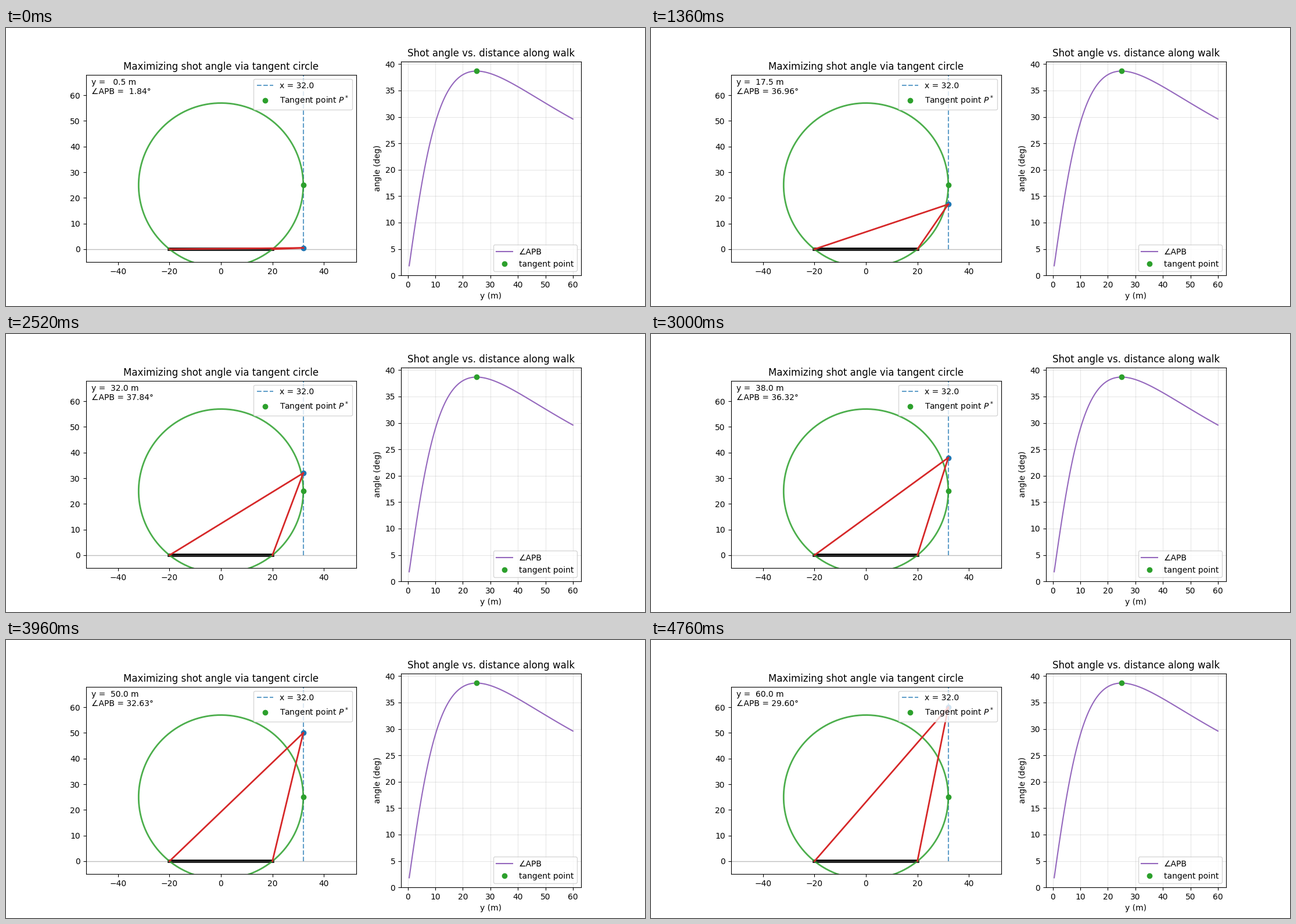
These frames come from a looping animation (1100 px wide and 480 px high, 4800 ms). A matplotlib script:

```python
import numpy as np
import matplotlib.pyplot as plt
from matplotlib.animation import FuncAnimation

HALF_GOAL = 20.0
WALK_X = 32.0
FRAMES = 120
INTERVAL = 40

walk = np.linspace(0.5, 60, FRAMES)
best_y = np.sqrt(WALK_X**2 - HALF_GOAL**2)


def shot_angle(y):
    """Angle APB in degrees, seen from (WALK_X, y)."""
    far = np.arctan2(WALK_X + HALF_GOAL, y)
    near = np.arctan2(WALK_X - HALF_GOAL, y)
    return np.degrees(far - near)


fig, (field, chart) = plt.subplots(
    1, 2, figsize=(11, 4.8), dpi=100, gridspec_kw={"width_ratios": [3, 2]}
)

# Field view
field.set_aspect("equal")
field.set_xlim(-52.5, 52.5)
field.set_ylim(-5, 68)
field.set_title("Maximizing shot angle via tangent circle")
field.plot([-HALF_GOAL, HALF_GOAL], [0, 0], color="black", lw=4)
field.axhline(0, color="gray", lw=1, alpha=0.5)
field.plot([WALK_X, WALK_X], [0, 70], "--", color="tab:blue", alpha=0.7,
           label=f"x = {WALK_X:.1f}")

theta = np.linspace(0, 2 * np.pi, 400)
field.plot(WALK_X * np.cos(theta), best_y + WALK_X * np.sin(theta),
           color="tab:green", lw=2, alpha=0.85)
field.plot([WALK_X], [best_y], "o", color="tab:green",
           label="Tangent point $P^*$")

player, = field.plot([], [], "o", color="tab:blue")
sight_a, = field.plot([], [], color="tab:red", lw=2)
sight_b, = field.plot([], [], color="tab:red", lw=2)
readout = field.text(0.02, 0.98, "", transform=field.transAxes, va="top")
field.legend(loc="upper right")

# Angle chart
chart.plot(walk, shot_angle(walk), color="tab:purple", label="∠APB")
chart.plot([best_y], [shot_angle(best_y)], "o", color="tab:green",
           label="tangent point")
chart.set_ylim(bottom=0)
chart.set_title("Shot angle vs. distance along walk")
chart.set_xlabel("y (m)")
chart.set_ylabel("angle (deg)")
chart.grid(alpha=0.3)
chart.legend(loc="lower right")


def update(i):
    y = walk[i]
    player.set_data([WALK_X], [y])
    sight_a.set_data([-HALF_GOAL, WALK_X], [0, y])
    sight_b.set_data([HALF_GOAL, WALK_X], [0, y])
    readout.set_text(f"y = {y:5.1f} m\n∠APB = {shot_angle(y):5.2f}°")
    return player, sight_a, sight_b, readout


anim = FuncAnimation(fig, update, frames=FRAMES, interval=INTERVAL,
                     repeat=True, repeat_delay=0)
plt.show()
```
